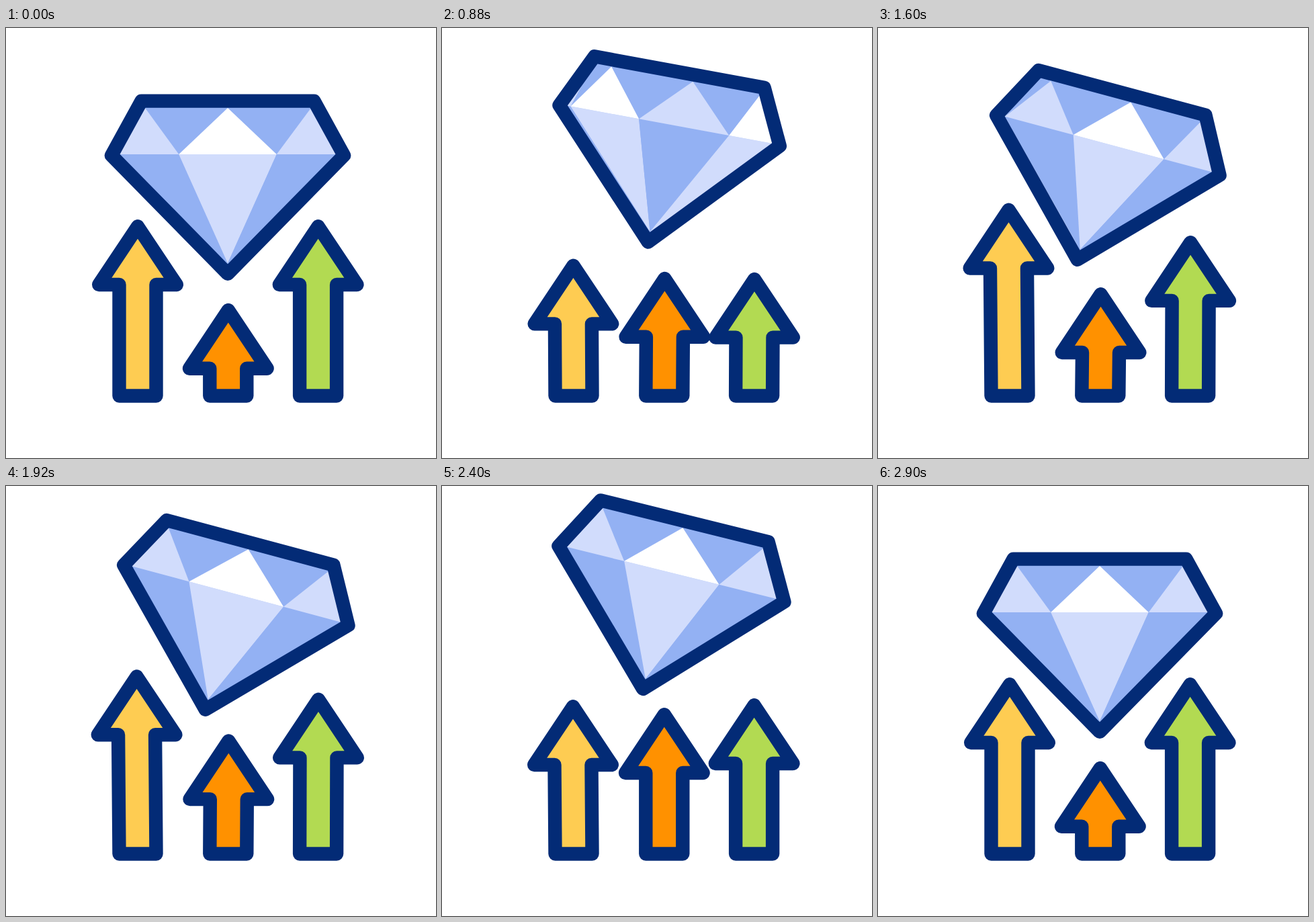
An HTML page for the animation above (3.12 s loop, 640x640 px).

```html
<!DOCTYPE html>
<html lang="en">
<head>
<meta charset="utf-8">
<title>Rising gem</title>
<style>
  html, body { margin: 0; width: 100%; height: 100%; overflow: hidden; background: #fff; }
  svg { display: block; width: 100vw; height: 100vh; }
  .line { stroke: #032b76; stroke-width: 20.4; stroke-linejoin: round; }
</style>
</head>
<body>
<svg id="stage" viewBox="0 0 640 640"></svg>
<script>
const NS = 'http://www.w3.org/2000/svg';
const LOOP = 3120, STEP = 20;
const BLUE = '#93b1f3', LIGHT = '#d1dcfc', WHITE = '#ffffff';
const stage = document.getElementById('stage');

function add(parent, tag, attrs = {}) {
  const el = document.createElementNS(NS, tag);
  for (const k in attrs) el.setAttribute(k, attrs[k]);
  return parent.appendChild(el);
}

const lerp = (a, b, u) => a + (b - a) * u;
const linear = u => u;
const smooth = u => u * u * (3 - 2 * u);

// Value at time t on a track of times and values.
function track(t, times, values, ease = smooth) {
  if (t <= times[0]) return values[0];
  for (let i = 1; i < times.length; i++) {
    if (t < times[i]) {
      const u = (t - times[i - 1]) / (times[i] - times[i - 1]);
      return lerp(values[i - 1], values[i], ease(u));
    }
  }
  return values[values.length - 1];
}

function at(list, q) {
  q = Math.max(0, Math.min(list.length - 1, q));
  const i = Math.min(Math.floor(q), list.length - 2);
  return lerp(list[i], list[i + 1], q - i);
}

const points = list => list.map(p => p.map(n => n.toFixed(2)).join(',')).join(' ');

// Gem, drawn around its own centre
const gem = add(stage, 'g');
const body = add(gem, 'polygon', { fill: BLUE });
const facets = [-1, 0, 1, 2].map(slot => ({
  slot,
  lower: add(gem, 'polygon'),
  upper: add(gem, 'polygon')
}));
const rim = add(gem, 'polygon', { class: 'line', fill: 'none' });

const GEM_TIMES = [500, 1100, 1700, 2300, 2900];
const SPIN_TIMES = [220, 880, 1200, 1600, 1700];
const APEX = [-129, -123, 0, 124, 129];

function drawGem(t) {
  const lift = track(t, GEM_TIMES, [0, -64.9, -12.8, -64.9, 0]);
  const tilt = track(t, GEM_TIMES, [0, 15, 15, 15, 0]);
  const spin = track(t, SPIN_TIMES, [0, 0.82, 1.35, 1.87, 2], linear);
  gem.setAttribute('transform', `translate(330 ${237.3 + lift}) rotate(${tilt})`);

  const half = 173 - 7.5 * (1 - Math.abs(spin - 1));
  const outline = points([[-128.5, -128.7], [128.5, -128.7], [half, -47.7], [0, 128.5], [-half, -47.7]]);
  body.setAttribute('points', outline);
  rim.setAttribute('points', outline);

  const turn = Math.ceil(spin), shift = turn - spin;
  const girdle = [-half, -72.8, 72.8, half];
  for (const { slot, lower, upper } of facets) {
    const q = slot + shift;
    const a = at(girdle, q), b = at(girdle, q + 1);
    const bright = (slot - 1 + turn) % 2 === 0;
    lower.setAttribute('points', points([[a, -49.3], [b, -49.3], [0, 113]]));
    lower.setAttribute('fill', bright ? LIGHT : BLUE);
    upper.setAttribute('points', points([[a, -49.3], [at(APEX, q + 1), -118.3], [b, -49.3]]));
    upper.setAttribute('fill', bright ? WHITE : LIGHT);
  }
}

// Arrows: fixed foot, moving head
const ARROW_TIMES = [490, 1085, 1700, 2300, 2900];
const arrows = [
  { x: 196, fill: '#fecc52', y: [382, 462.4, 349.5, 417.6, 382], dx: [0, -0.8, -1.6, -1.1, 0] },
  { x: 330.8, fill: '#ff9100', y: [506.7, 441.9, 486.1, 420.6, 506.7], dx: [0, 0.8, 0.7, 0, 0] },
  { x: 464.6, fill: '#b2da52', y: [382, 490.3, 399.5, 415.5, 382], dx: [0, 0.5, 0.5, 0, 0] }
];
for (const a of arrows) a.el = add(stage, 'polygon', { class: 'line', fill: a.fill });

function drawArrow(a, t) {
  const y = track(t, ARROW_TIMES, a.y);
  const x = a.x + track(t, ARROW_TIMES, a.dx);
  a.el.setAttribute('points', points([
    [x, y - 86.7], [x + 57.8, y], [x + 27.5, y], [a.x + 27.5, 547.5],
    [a.x - 27.5, 547.5], [x - 27.5, y], [x - 57.8, y]
  ]));
}

function draw(ms) {
  const t = Math.floor((ms % LOOP) / STEP) * STEP;
  drawGem(t);
  for (const a of arrows) drawArrow(a, t);
}

const start = performance.now();
function tick() {
  draw(performance.now() - start);
  requestAnimationFrame(tick);
}
tick();
</script>
</body>
</html>
```
